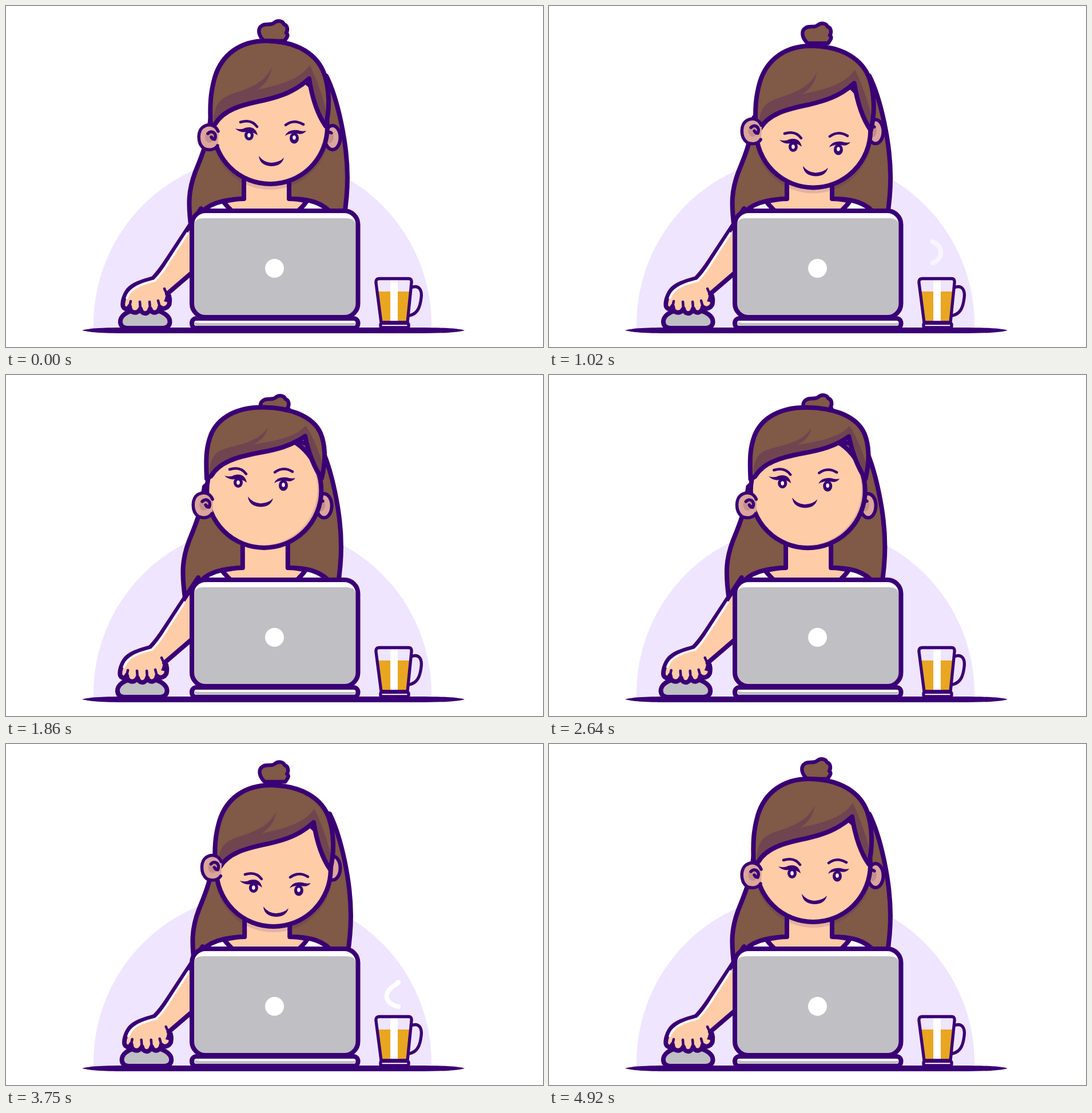
An HTML page for the animation above (4.98 s loop, 939 by 596 pixels).

```html
<!DOCTYPE html>
<html lang="en">
<head>
<meta charset="utf-8">
<title>Working at a laptop</title>
<style>
html, body { margin: 0; height: 100%; overflow: hidden; background: #fff; }
svg { display: block; width: 100vw; height: 100vh; }
.line { stroke: #3a0075; stroke-width: 8; stroke-linecap: round; stroke-linejoin: round; }
.thin { stroke-width: 5.3; }
.none { fill: none; }
.ink { fill: #3a0075; }
.hair { fill: #805947; }
.skin { fill: #ffcca8; }
.ear { fill: #dba69b; stroke-width: 6; }
.grey { fill: #c0bfc4; }
.white { fill: #fff; }
.glow { fill: none; stroke: #fff; stroke-width: 8; stroke-linecap: round; }
</style>
</head>
<body>
<svg viewBox="0 0 939 596">
  <clipPath id="faceClip"><circle cx="462" cy="211" r="100"/></clipPath>
  <path fill="#efe5ff" d="M153 564V557A295.5 295.5 0 0 1 744 557V564Z"/>

  <path id="backHair" class="line hair" d="M324 390C318 345 319 322 331 290C342 262 351 245 358 195L460 110L560 122C580 162 597 240 597 300C597 325 595 345 591 370Z"/>

  <g id="body">
    <path class="line white" d="M338 366C352 345 380 338 416 337L495 337C530 337 555 343 572 366Z"/>
    <path class="line skin" d="M416 290V337C405 337 392 339 380 342Q388 352 400 363H505Q518 353 526 341C515 338 505 337 495 337V290Z"/>
  </g>

  <circle id="shadow" cx="462" cy="211" r="103" fill="#3a0075" opacity=".13"/>

  <g id="rightEar">
    <ellipse class="line ear" cx="571" cy="230" rx="13.5" ry="21"/>
    <ellipse cx="565" cy="229" rx="8" ry="11" fill="#c58f8a"/>
    <path class="line none thin" d="M562 222Q566 219 569 222"/>
  </g>

  <g id="face">
    <g clip-path="url(#faceClip)">
      <circle cx="462" cy="211" r="100" fill="#e5b49e"/>
      <circle id="light" class="skin" cx="462" cy="211" r="98"/>
    </g>
    <circle class="line none" cx="462" cy="211" r="100"/>
  </g>

  <path id="bun" class="line hair" style="stroke-width:6.5" d="M451 61C441 51 439 39 448 34C455 30 462 34 468 30C475 24 484 26 486 32C493 34 493 43 490 47C495 51 491 55 487 61Z"/>

  <g id="cap">
    <path id="capFill" class="hair"/>
    <path id="capShade" fill="#704550"/>
    <path id="capLine" class="line none"/>
  </g>

  <g id="eyes">
    <path class="line none" style="stroke-width:4.5" d="M410 203Q429 197 439 211M489 208Q504 197 520 207"/>
    <path class="ink" d="M401 214Q412 217 418 213Q436 208 440 226Q432 219 420 220Q409 222 401 214Z"/>
    <ellipse class="ink" cx="425" cy="226" rx="8" ry="9"/>
    <ellipse class="white" cx="425" cy="226" rx="2.8" ry="3.8"/>
    <path class="ink" d="M488 227Q493 215 510 217Q518 220 525 218Q519 226 509 223Q497 221 488 227Z"/>
    <ellipse class="ink" cx="504" cy="231" rx="8" ry="9.5"/>
    <ellipse class="white" cx="504" cy="230" rx="2.8" ry="3.8"/>
  </g>
  <path id="mouth" class="ink" d="M442 262Q444 279 464 280Q482 280 486 265Q479 273 464 274Q450 273 442 262Z"/>

  <g id="leftEar">
    <path class="ear" d="M372 219C366 207 355 206 347 210C334 216 334 240 346 249C357 255 367 250 371 243Z"/>
    <ellipse cx="356" cy="229" rx="8" ry="10" fill="#c58f8a"/>
    <path class="line none" style="stroke-width:5.5" d="M371 219C366 207 355 206 347 210C334 216 334 240 346 249C357 254 366 250 370 244"/>
    <path class="line none" style="stroke-width:5.5" d="M353 223C359 216 370 222 365 233Q361 233 359 229"/>
  </g>

  <path class="ink" d="M133 567C150 562 180 562 220 562H720C760 562 790 563 802 567C790 571 760 572 720 572H220C170 572 150 571 133 567Z"/>

  <g id="arm">
    <path class="line grey" d="M211 563C197 562 197 546 207 539C222 527 264 527 279 539C290 547 289 562 275 563Z"/>
    <path class="line skin" d="M341 354L281 445Q268 465 257 476C245 480 225 484 214 496C206 506 201 524 207 528C211 531 214 529 216 525C217 538 230 539 235 529C237 540 249 540 252 529C255 539 267 538 269 526C275 532 286 527 286 517Q287 508 282 503L345 449Z"/>
    <path class="none" stroke="#fff" stroke-width="4" stroke-linejoin="round" d="M318 396L285 447Q272 468 260 480C245 484 229 488 219 498Q213 504 211 512"/>
    <path class="line none" style="stroke-width:4.5" d="M216 525L218 516M235 529L234 517M252 529L251 517M269 526L266 515M277 494Q280 502 283 504"/>
    <path class="ink" d="M276 494Q282 506 276 516L287 519L289 505Z"/>
  </g>

  <rect class="white" x="325" y="358" width="290" height="186" rx="24"/>
  <path class="grey" d="M328 384Q329 371 345 371H595Q611 371 612 384V522Q612 542 592 542H348Q328 542 328 522Z"/>
  <rect class="line none" x="325" y="358" width="290.5" height="186" rx="24"/>
  <circle class="white" cx="469.5" cy="458.5" r="16.5"/>
  <rect class="line white" x="325" y="546" width="290.5" height="17" rx="8"/>
  <path class="grey" d="M329 552Q334 554 342 554H611Q611 559 606 559H335Q329 559 329 552Z"/>

  <g>
    <path fill="#efe5ff" d="M647 484Q647 477 653 477H704Q710 477 709 484L702 553H656Z"/>
    <path fill="#e9a621" d="M649 499H707L702 552H655Z"/>
    <path class="white" d="M672 479H685V552H672Z"/>
    <path class="line none thin" d="M647 484Q646 476.5 653 476.5H704Q710 476.5 709 484L702 553H656ZM709 492C721 487 728 495 726 510C724 529 718 538 706 541"/>
    <rect class="line white thin" x="655" y="554.5" width="49" height="7.5" rx="2"/>
  </g>

  <path id="steamA" class="glow" pathLength="1" d="M671 449C690 441 690 421 671 412Q665 407 664 400"/>
  <path id="steamB" class="glow" pathLength="1" d="M686 459C671 456 662 446 667 435C670 425 682 422 687 415Q692 408 692 402"/>
</svg>
<script>
const LOOP = 4980;
const $ = id => document.getElementById(id);

// time, body lean, hair x, features x, head pitch, bun y
const keys = [
  [0, 0, 0, 0, 0, 0],
  [560, 1, 4, 2.5, 18, 3],
  [1000, 0.5, 4, 2.5, 20, 4],
  [1260, -16, -12, -28, 18, 7],
  [1440, -16, -12, -28, 8, 4],
  [1860, -11, -7, -19, -38, 10],
  [2400, -10.5, -6.5, -18, -38, 10],
  [2720, -9, -5, -16, -36, 8.5],
  [3120, 6, 8, 9, -25, 6],
  [3450, 6, 8, 9, 0, -2],
  [3740, 6, 8, 8, 25, 5],
  [4230, -15, -11.5, -27, 18, 8],
  [4380, -15.5, -12, -28, 16, 6.5],
  [4900, 0, 0, 0, 0, 0],
  [LOOP, 0, 0, 0, 0, 0]
];

const fringe = "C545 190 536 165 530 127C505 150 480 158 450 165C410 173 380 182 366 206";
const crown = "M358 211C356 170 358 150 365 125C377 85 410 60 457 61C510 62 545 85 557 120C565 145 567 178 559 210";
const shade = "M363 197C366 170 375 162 392 155C420 145 450 138 465 107C460 128 455 135 440 146C480 138 515 128 531 103C540 120 555 160 560 185L557 207" + fringe + "Z";

const slope = (i, c) => (keys[i + 1][c] - keys[i][c]) / (keys[i + 1][0] - keys[i][0]);

function tangent(i, c) {
  if (i === 0 || i === keys.length - 1) return 0;
  const a = slope(i - 1, c), b = slope(i, c);
  return a * b <= 0 ? 0 : 2 * a * b / (a + b);
}

// Monotone cubic between keys, so holds never overshoot
function sample(t, c) {
  let i = 0;
  while (t >= keys[i + 1][0]) i++;
  const [p, q] = [keys[i], keys[i + 1]], span = q[0] - p[0], u = (t - p[0]) / span;
  const ease = u * u * (3 - 2 * u);
  return p[c] + (q[c] - p[c]) * ease
    + span * u * (1 - u) * ((1 - u) * tangent(i, c) - u * tangent(i + 1, c));
}

const move = (id, x, y = 0) => $(id).setAttribute("transform", `translate(${x} ${y})`);

function steam(id, u, fade) {
  const path = $(id), on = u > 0 && u < 1;
  path.style.opacity = on ? Math.min(1, u * 2, (1 - u) * fade) : 0;
  if (on) path.setAttribute("stroke-dasharray", `${1 - (1 - u) ** 1.5} 2`);
}

function draw(t) {
  const [lean, hairX, featX, pitch, bunY] = [1, 2, 3, 4, 5].map(c => sample(t, c));
  const up = Math.min(pitch, 0), down = Math.max(pitch, 0);
  const faceY = .24 * up + .32 * down;

  move("backHair", lean);
  move("body", lean * .2);
  move("arm", lean * .45);
  move("face", lean * .97, faceY);
  move("shadow", lean * .97, faceY + 7 + .2 * up);
  move("light", (featX - lean) * .6, up * .06);
  move("eyes", featX, pitch);
  move("mouth", featX, 1.3 * up + .88 * down);
  move("leftEar", lean * .9, .05 * up - .53 * down);
  move("rightEar", 1.35 * Math.min(lean, 0), .04 * up - .53 * down);
  move("bun", bunY * .25, bunY);
  move("cap", hairX);

  // The crown shifts less than the fringe when the head tilts back
  const top = .11 * up + .44 * down, low = .53 * up + .4 * down;
  const bend = d => d.replace(/([\d.]+) ([\d.]+)/g, (_, x, y) =>
    `${x} ${+y + top + (low - top) * Math.min(1.6, Math.max(0, (y - 60) / 67))}`);
  $("capFill").setAttribute("d", bend(crown + fringe + "Z"));
  $("capLine").setAttribute("d", bend(crown + fringe + "Z"));
  $("capShade").setAttribute("d", bend(shade));

  steam("steamA", t / 1600, 1.65);
  steam("steamB", (t - 2700) / 1600, 11);
}

const start = performance.now();
function tick() {
  draw((performance.now() - start) % LOOP);
  requestAnimationFrame(tick);
}
tick();
</script>
</body>
</html>
```
